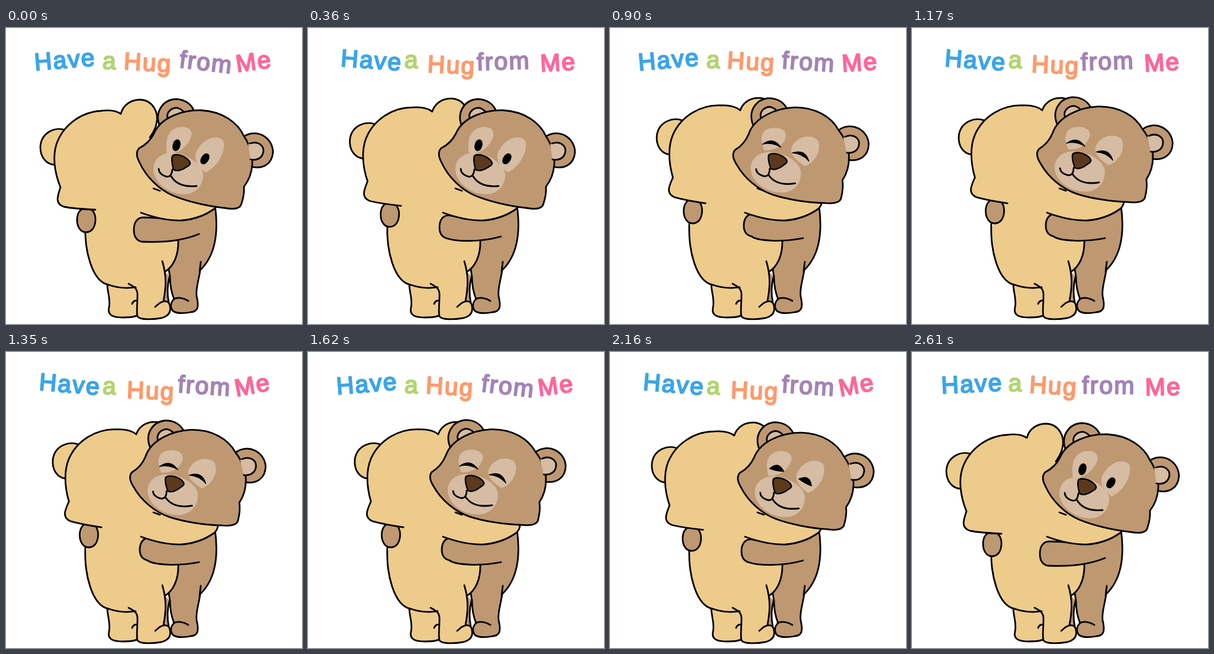
These frames come from a looping animation (500 by 500 pixels, 2700 ms). An HTML page:

```html
<!DOCTYPE html>
<html lang="en">
<head>
<meta charset="utf-8">
<title>Have a Hug from Me</title>
<style>
  html, body { margin: 0; height: 100%; overflow: hidden; background: #fff; }
  svg { display: block; width: 100vw; height: 100vh; }
  path { fill: none; stroke: #000; stroke-width: 2.8; stroke-linecap: round; stroke-linejoin: round; }
  .yellow { fill: #edcb8b; }
  .brown { fill: #be9871; }
  .light { fill: #d5bca2; }
  .plain { stroke: none; }
  .dark { fill: #000; stroke-width: 1; }
  .nose { fill: #5b3a1c; stroke-width: 2.4; }
  .patch { transform-box: fill-box; transform-origin: center; }
  text {
    font: 41px "Liberation Sans", Arial, sans-serif;
    letter-spacing: 2.1px; text-anchor: middle;
    stroke-width: 2.1; stroke-linejoin: round;
  }
</style>
</head>
<body>
<svg viewBox="0 0 500 500">
  <g id="words"></g>

  <!-- brown body and legs -->
  <path class="brown plain" d="M262 405 L277 420 C273 432 271 444 275 464 L262 464Z"/>
  <path d="M276 421 C273 432 271 444 275 464"/>
  <path class="brown" d="M353 300 C360 350 351 387 328 409 C326 425 320 440 322 453
    C326 470 325 479 312 480 C302 482 289 483 282 478 C276 471 279 462 284 458 C279 446 277 432 277 420 L262 330"/>
  <path d="M283 458 C290 454 300 456 308 461 M329 395 L327 412"/>

  <!-- yellow body and legs -->
  <path class="yellow" d="M171 433 C172 450 177 460 174 472 C171 485 180 489 198 489 C214 489 227 487 228 478 L224 436"/>
  <path d="M213 466 C215 460 221 459 225 462"/>
  <path class="yellow plain" d="M134 340 C131 385 145 440 200 439 L222 440 L268 412 C282 405 291 385 291 358
    L300 300 L290 250 L238 192 L205 205 L150 295Z"/>
  <path d="M134 330 C132 375 145 429 174 434 C192 440 210 440 222 437 M291 358 C292 385 282 404 268 412"/>
  <path class="yellow plain" d="M222 440 C223 460 220 475 222 486 C226 493 250 492 262 490 C274 487 279 480 277 470
    C276 462 270 461 266 463 C270 440 272 420 264 394 L207 420Z"/>
  <path d="M207 432 C219 438 223 442 222 454 C222 468 220 478 222 487 C226 494 250 492 262 490
    C274 487 279 480 277 470 C276 461 268 459 259 465 L252 471 M264 394 C272 420 270 440 266 461"/>

  <path id="hand" class="brown" d="M136 304 C146 304 152 314 151 326 C150 338 144 345 135 345 C126 345 120 336 120 324 C120 312 126 304 136 304Z"/>

  <g id="yellowHead">
    <path class="yellow" d="M104 174 C84 164 59 177 58 201 C58 219 69 231 83 231"/>
    <path class="yellow" d="M151 307 C128 306 109 304 98 302 C82 297 87 284 92 269 C81 242 79 216 85 197
      C96 164 127 142 160 140 C175 138 187 140 194 145 C198 129 212 121 227 121 C248 122 259 143 254 162 C252 173 247 178 243 185"/>
  </g>

  <path id="arm" class="brown"/>
  <path class="yellow plain" d="M228 312 C264 326 307 334 354 303 L358 291 L250 230Z"/>
  <path d="M228 312 C250 320 274 326 298 325 C318 323 337 316 351 306 C356 302 358 297 358 292 M249 271 L260 275"/>

  <g id="brownHead">
    <path class="brown" d="M259 164 C251 140 266 121 287 120 C304 121 314 130 318 141"/>
    <path class="light" d="M273 153 C270 141 281 134 290 135 C296 137 299 140 301 143"/>
    <path class="brown" d="M402 183 C425 169 451 186 451 210 C449 231 433 239 413 234"/>
    <path class="brown" d="M250 178 C262 150 300 138 330 139 C366 141 392 160 402 183 C411 196 417 214 416 230
      C415 246 409 259 402 268 C403 283 399 293 397 299 C393 307 380 306 369 304 C340 301 306 293 282 283
      C259 273 237 252 226 228 C220 217 219 209 225 203 C237 197 244 190 250 178Z"/>
    <path class="light plain" d="M409 196 C426 188 437 201 434 211 C431 221 422 225 413 223Z"/>
    <path d="M412 195 C427 190 438 200 434 212 C431 221 422 224 413 222"/>
    <path class="patch light plain" d="M272 213 C268 188 274 168 298 167 C314 168 317 178 310 190 C303 203 290 213 272 213Z"/>
    <path class="patch light plain" d="M337 244 C326 235 315 222 322 208 C332 187 356 178 367 190 C373 207 357 236 337 244Z"/>
    <path class="light plain" d="M249 240 C248 222 262 211 280 211 C306 212 331 230 333 246 C334 266 320 281 300 281 C274 280 251 262 249 240Z"/>
    <path d="M281 239 C280 250 275 253 268 250 C261 247 258 242 258 238 M278 249 C285 262 300 269 322 267"/>
    <path class="nose" d="M281 216 C285 212 298 214 307 222 C313 228 312 231 306 234 C298 240 288 243 283 239 C281 232 279 222 281 216Z"/>
    <path class="eye dark" transform="translate(288 198) rotate(14)"/>
    <path class="eye dark" transform="translate(336 221) rotate(31)"/>
  </g>
</svg>
<script>
const STEP = 90, STEPS = 30, TEXT_STEPS = 9;
const $ = id => document.getElementById(id);
const all = selector => document.querySelectorAll(selector);

const wave = (step, period, peak) => Math.cos(2 * Math.PI * (step - peak) / period);

function smooth(from, to, step) {
  const k = Math.min(1, Math.max(0, (step - from) / (to - from)));
  return k * k * (3 - 2 * k);
}

// Rises to 1 between the first two steps and falls back between the last two
const pulse = (step, rise, full, leave, rest) => smooth(rise, full, step) - smooth(leave, rest, step);

// Each word rocks around its middle; dx, dy and turn are the reach at the peak step
const words = [
  { label: 'Have', color: '#3ba5e8', x: 104, y: 68, angle: 0.3, dx: 3.5, dy: 0.5, turn: 5.5, peak: 5.1 },
  { label: 'a', color: '#b2d46f', x: 175, y: 69, angle: 2, dx: 0, dy: 3, turn: 1, peak: 7 },
  { label: 'Hug', color: '#ff9a6c', x: 241, y: 75, angle: 3, dx: 3.3, dy: 4.5, turn: -0.7, peak: 5.8 },
  { label: 'from', color: '#a384b4', x: 334, y: 71, angle: 3, dx: 3.5, dy: 1, turn: 5, peak: 8 },
  { label: 'Me', color: '#ff6699', x: 421.5, y: 71, angle: -6.5, dx: 3.5, dy: 2, turn: 6, peak: 2.6 },
];
for (const word of words) {
  word.node = document.createElementNS('http://www.w3.org/2000/svg', 'text');
  word.node.textContent = word.label;
  word.node.setAttribute('fill', word.color);
  word.node.setAttribute('stroke', word.color);
  $('words').append(word.node);
}

function place(node, x, y, angle = 0, pivot = '') {
  node.setAttribute('transform', `translate(${x} ${y}) rotate(${angle} ${pivot})`);
}

function eyePath(closed) {
  if (closed < 0.2) return 'M0 -9.5 C8 -9.5 8 9.5 0 9.5 C-8 9.5 -8 -9.5 0 -9.5Z';
  const half = 9 + closed * 7, low = 14 - closed * 18;
  return `M${-half} 3 Q0 -14 ${half} 3 Q0 ${low} ${-half} 3Z`;
}

function armPath(hug) {
  const x = 216 + hug * 10, top = 320 - hug * 6, low = 361 - hug * 9;
  return `M300 324 C280 324 260 ${320 + hug} ${x + 16} ${top} C${x + 5} ${top} ${x} ${top + 9} ${x} ${341 - hug * 7}
    C${x} ${low - 8} ${x + 5} ${low - 2} ${x + 13} ${low} C250 ${362 - hug * 2} 290 ${363 - hug} 326 ${348 + hug * 7}`;
}

function draw(now) {
  const step = Math.floor(now / STEP) % STEPS;

  for (const { node, x, y, angle, dx, dy, turn, peak } of words) {
    const rock = wave(step % TEXT_STEPS, TEXT_STEPS, peak);
    place(node, x + dx * rock, y + dy * rock, angle + turn * rock);
  }

  const hug = pulse(step, 0, 7, 21, 28);
  place($('yellowHead'), hug * 11, hug * -11, hug * 5.6, '150 300');
  place($('hand'), hug * 4.5, hug * -15);
  $('arm').setAttribute('d', armPath(hug));

  const nuzzle = pulse(step, 4, 8, 21, 27);
  const sideways = -11.5 - 2.5 * wave(step, 10, 8);
  const upward = -4 + 2 * wave(step, 20, 8);
  place($('brownHead'), nuzzle * sideways, nuzzle * upward, nuzzle * -4.4, '295 226');

  const closed = pulse(step, 4, 7, 22, 26);
  all('.eye').forEach(eye => eye.setAttribute('d', eyePath(closed)));
  all('.patch').forEach(patch => {
    patch.style.transform = `rotate(28deg) scale(${1 + closed * 0.08}, ${1 - closed * 0.2}) rotate(-28deg)`;
  });
}

let start;
function tick(now) {
  start ??= now;
  draw(now - start);
  requestAnimationFrame(tick);
}
draw(0);
requestAnimationFrame(tick);
</script>
</body>
</html>
```
